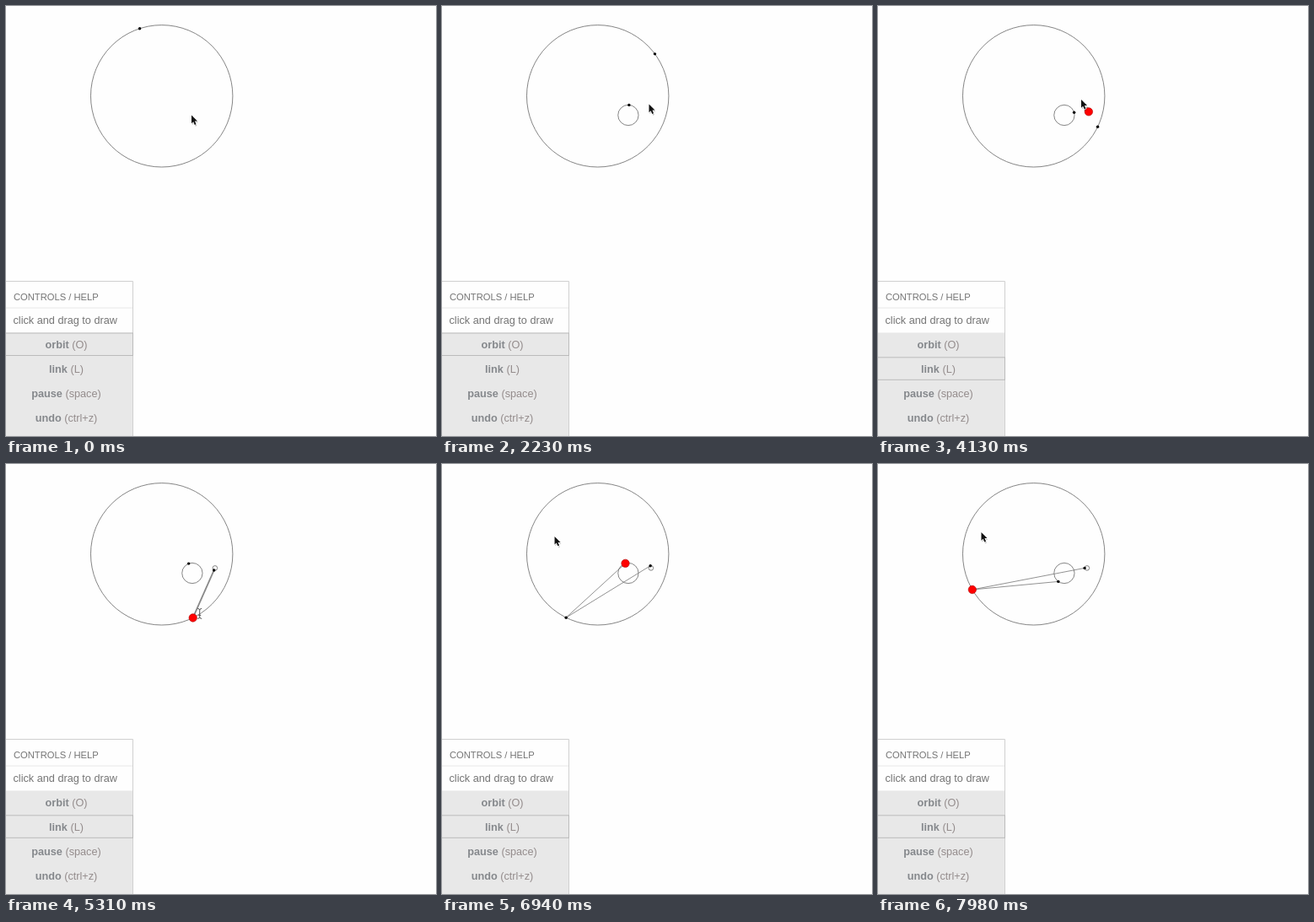
An HTML page that plays this animation: 510x510 px, repeating every 8 s.

```html
<!DOCTYPE html>
<html lang="en">
<head>
<meta charset="utf-8">
<title>Orbits and links</title>
<style>
  html, body { margin: 0; width: 100%; height: 100%; overflow: hidden; background: #fefefe; }
  svg { display: block; width: 100%; height: 100%; }
  text { font: 12.7px "Liberation Sans", Arial, sans-serif; fill: #747474; }
  .title { font-size: 11.2px; }
  .button { fill: #948c8c; text-anchor: middle; }
  .button tspan { font-weight: bold; fill: #85888c; }
  .orbit { fill: none; stroke: #666; stroke-width: .8; }
  .link { stroke: #777; stroke-width: .8; }
  .drag { stroke: #888; stroke-width: 1.8; }
  .dot { fill: #000; }
  .near { fill: #f00; stroke: #a00; stroke-width: .6; }
</style>
</head>
<body>
<svg viewBox="0 0 510 510">
  <g id="panel">
    <rect y="387.5" width="150" height="123" fill="#e8e8e8"/>
    <path d="M0 326.5H150.5V510" fill="none" stroke="#d0d0d0"/>
    <path d="M0 358H150" stroke="#e8e8e8"/>
    <rect id="selected" x="-2" width="152.5" height="26.5" fill="none" stroke="#bbb"/>
    <text class="title" x="9" y="349">CONTROLS / HELP</text>
    <text x="8.5" y="377">click and drag to draw</text>
    <text class="button" x="71.5" y="406"><tspan>orbit</tspan> (O)</text>
    <text class="button" x="71.5" y="435"><tspan>link</tspan> (L)</text>
    <text class="button" x="71.5" y="464"><tspan>pause</tspan> (space)</text>
    <text class="button" x="71.5" y="493"><tspan>undo</tspan> (ctrl+z)</text>
  </g>
  <g id="scene"></g>
  <g id="pointer">
    <g id="arrow" transform="scale(.88)">
      <path d="M1 2V13L3.5 10.7 5.3 15 7.3 14.2 5.5 10H9Z" opacity=".25"/>
      <path d="M0 0V11L2.5 8.7 4.3 13 6.3 12.2 4.5 8H8Z" fill="#111" stroke="#fff" stroke-width="1.6" paint-order="stroke"/>
    </g>
    <path id="beam" d="M-2.5 -6Q0 -6 0 -4Q0 -6 2.5 -6M0 -4V4M-2.5 6Q0 6 0 4Q0 6 2.5 6M-1.5 2H1.5" fill="none" stroke="#555"/>
  </g>
</svg>
<script>
const LOOP = 8000, STEP = 147.6, LEAD = 15;
const LINK_MODE = 20;
const $ = id => document.getElementById(id);
const clamp = v => Math.min(1, Math.max(0, v));
const easeOut = p => 1 - (1 - p) ** 2;
const distance = (p, q) => Math.hypot(p.x - q.x, p.y - q.y);
const mix = (p, q, k) => ({ x: p.x + (q.x - p.x) * k, y: p.y + (q.y - p.y) * k });

// Every dot travels its circle at the same speed, so small circles spin faster.
const SPEED = 7.02;
const orbit = (x, y, r, phase, born, growth = 1) => ({ x, y, r, phase, born, growth });
const big = orbit(184.7, 106.8, 84.2, -.315, -9);
const small = orbit(220.9, 129.5, 12.15, -8.59, 2, 4);
const tiny = orbit(247.9, 123.4, 2.8, -67.84, 17);
const orbits = [big, small, tiny];

const radius = (o, step) => o.r * clamp((step - o.born) / o.growth);
function dotOf(o, step) {
  const angle = o.phase + SPEED * step / o.r, r = radius(o, step);
  return { x: o.x + r * Math.sin(angle), y: o.y - r * Math.cos(angle) };
}

const links = [
  { a: tiny, b: big, press: 29, release: 38 },
  { a: big, b: small, press: 42, release: 46 }
];

// The pointer eases from one target to the next; a target may be moving.
const at = (x, y) => () => ({ x, y });
function besideBig(step) {
  const dot = dotOf(big, step);
  return { x: dot.x + 8, y: dot.y - 5 };
}
const moves = [
  { start: 2, end: 6, to: at(233, 128) },
  { start: 6, end: 11, to: at(245.5, 116.5) },
  { start: 22, end: 28, to: at(241, 111) },
  { start: 28, end: 31, to: besideBig },
  { start: 41, end: 45, to: at(222, 125) },
  { start: 45, end: 48, to: at(122.5, 81) }
];
const pointerAt = step => moves.reduce(
  (p, m) => mix(p, m.to(step), easeOut(clamp((step - m.start) / (m.end - m.start)))),
  { x: 220, y: 129.5 });

const circle = (c, p, r) => `<circle class="${c}" cx="${p.x}" cy="${p.y}" r="${r}"/>`;
const line = (c, p, q) => `<line class="${c}" x1="${p.x}" y1="${p.y}" x2="${q.x}" y2="${q.y}"/>`;

function draw(step) {
  const mouse = pointerAt(step);
  const visible = orbits.filter(o => step > o.born);
  const dots = visible.map(o => dotOf(o, step));
  const nearest = dots.reduce((p, q) => distance(q, mouse) < distance(p, mouse) ? q : p);
  const linking = step >= LINK_MODE;

  let svg = visible.map(o => circle('orbit', o, radius(o, step))).join('');
  let dragging = step > small.born && step < small.born + small.growth;
  for (const { a, b, press, release } of links) {
    if (step >= release) svg += line('link', dotOf(a, step), dotOf(b, step));
    else if (step >= press) {
      dragging = true;
      svg += line('drag', dotOf(a, step), distance(nearest, mouse) < 15 ? nearest : mouse);
    }
  }
  svg += dots.map(p => circle('dot', p, 1.7)).join('');
  if (linking) svg += circle('near', nearest, 4.7);
  $('scene').innerHTML = svg;

  $('selected').setAttribute('y', linking ? 416.8 : 388);
  $('pointer').setAttribute('transform', `translate(${mouse.x} ${mouse.y})`);
  $('arrow').style.display = dragging ? 'none' : '';
  $('beam').style.display = dragging ? '' : 'none';
}

const began = performance.now();
let shown = -1;
function tick() {
  const time = (performance.now() - began) % LOOP;
  const step = Math.floor((time + LEAD) / STEP);
  if (step !== shown) draw(shown = step);
  requestAnimationFrame(tick);
}
tick();
</script>
</body>
</html>
```
